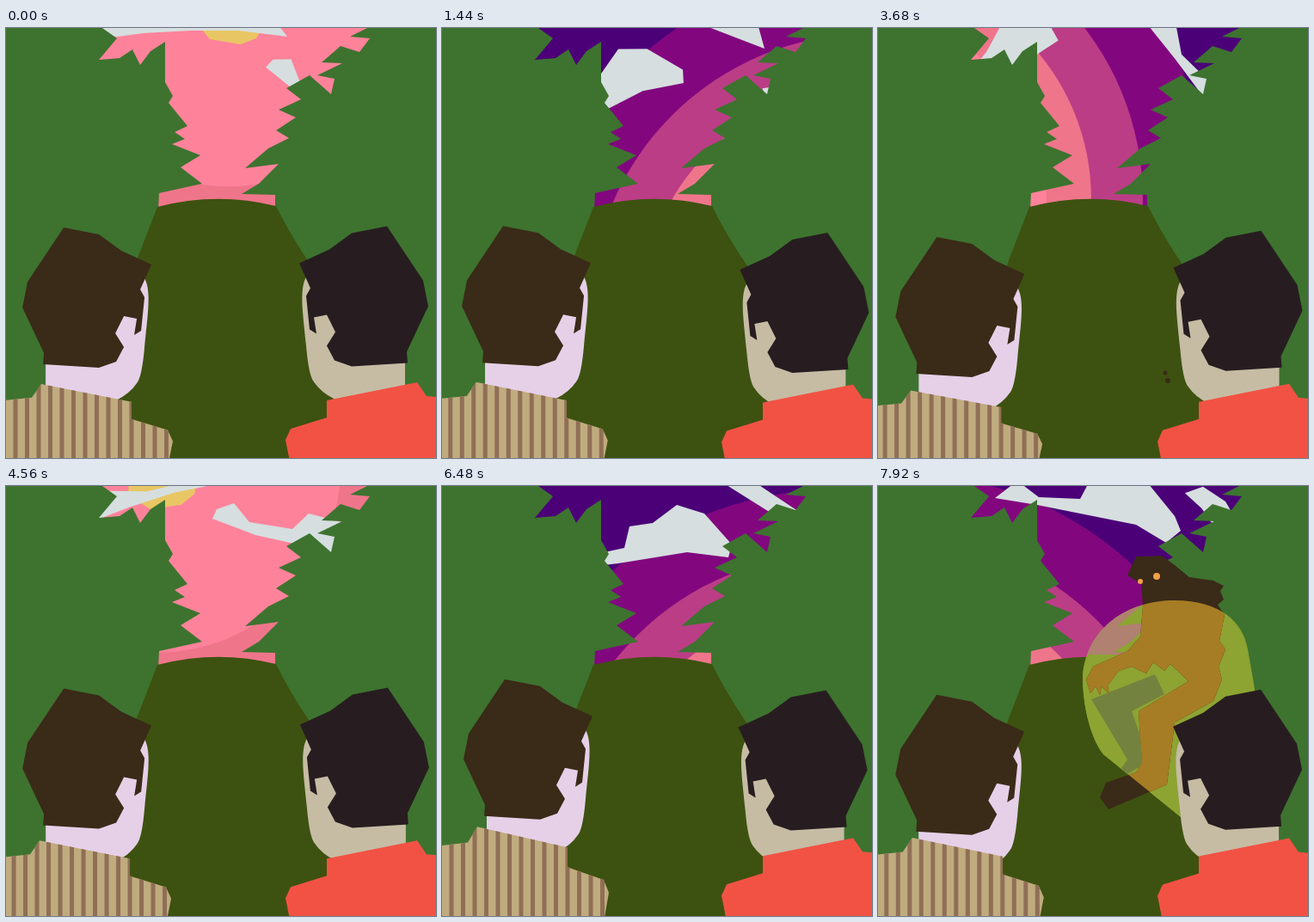
Animation, 500 px wide and 500 px high, one loop 8000 ms. Source, as an HTML page with a canvas:

```html
<!DOCTYPE html>
<html lang="en">
<head>
<meta charset="utf-8">
<title>Turning sky</title>
<style>
html, body { margin: 0; width: 100%; height: 100%; overflow: hidden; background: #3d732f; }
canvas { display: block; }
</style>
</head>
<body>
<canvas id="stage" width="500" height="500"></canvas>
<script>
const ctx = document.getElementById('stage').getContext('2d');
const LOOP = 8000, STEP = 80, TURN = 4800;
const SKY = { x: 247, y: 238 };
const GREEN = '#3d732f', BROWN = '#3a2a18', CLOUD = '#d6dedf';

const path = d => new Path2D('M' + d + 'Z');
const rad = deg => deg * Math.PI / 180;
// Cosine of the time within a period in ms
const wave = (t, period) => Math.cos(2 * Math.PI * t / period);
const smooth = k => {
  k = Math.max(0, Math.min(1, k));
  return k * k * (3 - 2 * k);
};

function fill(shape, color) {
  ctx.fillStyle = color;
  ctx.fill(shape);
}

function scoped(draw) {
  ctx.save();
  draw();
  ctx.restore();
}

function dot(x, y, r, color) {
  const disc = new Path2D();
  disc.arc(x, y, r, 0, 2 * Math.PI);
  fill(disc, color);
}

const sun = path('228,2 237,13 273,19 291,12 303,-8 280,-68 240,-66 219,-15');
const moon = path('208,8 218,30 243,40 277,33 286,21 265,27 261,8');
// Each cloud with the turn, in degrees, at which its points hold
const clouds = [
  [0, path('100,14 160,6 215,3 270,3 327,10 318,-2 240,-8 195,-23 120,-12')],
  [54, path('185,38 190,28 225,15 305,22 320,45 250,52')],
  [108, path('250,-16 310,-1 375,24 367,-5 285,-28')],
  [126, path('119,100 119,85 135,68 161,83 212,72 218,47 245,43 273,22 305,32 337,68 333,83 285,77 205,90')],
  [174, path('103,28 107,6 135,-8 295,-8 315,17 265,10 220,11 165,17 128,20')],
  [234, path('136,14 162,-6 187,13 235,15 243,0 310,-8 345,35 352,52 335,66 300,45 240,33 185,22')],
  [342, path('240,38 245,27 265,20 283,42 333,50 352,32 390,42 439,46 460,81 436,113 413,98 335,67 290,57')]
];
const glow = [[400, '#82077f'], [325, '#bb3d86'], [265, '#ef758b'], [213, '#ff829b']];

const gap = path('112,-5 112,0 129,12 108,37 132,35 147,25 156,43 168,27 185,16 185,63 194,79 189,87 ' +
  '211,114 196,121 208,129 193,135 226,148 203,162 228,181 178,192 177,212 313,212 313,194 274,193 ' +
  '294,181 317,158 278,163 305,140 329,128 314,119 337,104 317,95 343,83 326,70 353,55 378,77 382,59 ' +
  '362,55 391,41 367,40 389,21 411,28 423,12 400,10 420,0 420,-5');
const leaves = new Path2D();
leaves.rect(0, 0, 500, 500);
leaves.addPath(gap);
const hill = path('176,208 Q245,190 314,207 Q330,240 356,278 L380,340 V500 H130 V340 L152,270');

// The right figure is the left one mirrored
const face = path('163,290 C171,305 167,330 163,370 Q160,405 154,412 Q146,424 130,432 L120,460 H48 V385');
const hair = path('69,231 110,239 136,258 171,274 158,303 163,312 159,351 151,356 154,337 139,334 ' +
  '129,354 139,370 130,387 110,394 45,390 46,377 21,324 27,294');
const body = path('41,413 146,434 146,454 188,467 194,480 190,500 180,560 -40,560 -40,432 0,432 30,429');

const beast = path('290,104 300,82 330,81 345,92 362,106 390,110 402,116 398,122 402,132 395,138 403,150 ' +
  '397,180 404,190 396,210 400,225 390,250 345,275 336,347 268,376 258,362 265,345 300,333 ' +
  '307,322 303,262 361,227 340,207 333,215 320,205 312,218 295,210 280,215 ' +
  '267,232 269,242 260,233 258,243 253,233 247,241 242,225 250,210 290,192 305,175 308,140 306,114');
const farLeg = path('248,248 322,219 333,242 295,262 305,290 307,325 288,336 283,328 290,318');
const beam = path('352,385 L262,312 C245,290 238,250 238,222 C242,165 290,133 345,133 C400,133 425,160 430,190 L438,236 V385');

function drawSky(t) {
  const turn = t / TURN * 360, a = rad(turn + 2.5);
  const turned = (from, shape, color) => scoped(() => {
    ctx.translate(SKY.x, SKY.y);
    ctx.rotate(rad(turn - from));
    ctx.translate(-SKY.x, -SKY.y);
    fill(shape, color);
  });
  ctx.fillStyle = '#4b0078';
  ctx.fillRect(0, 0, 500, 500);
  for (const [r, color] of glow)
    dot(SKY.x + 267 * Math.sin(a), SKY.y - 267 * Math.cos(a), r, color);
  turned(0, sun, '#e9c664');
  turned(174, moon, '#bb3d86');
  for (const [from, shape] of clouds) turned(from, shape, CLOUD);
}

function drawFingers(t) {
  if (t < 3400 || t > 4000) return;
  const x = 14 * smooth(Math.abs(t - 3680) / 300);
  dot(334 + x, 401, 2.5, BROWN);
  dot(337 + x, 410, 3, BROWN);
}

function drawBeast(t) {
  if (t < 6800) return;
  const lit = t >= 7500;
  const slide = 190 * (1 - smooth((t - 6800) / 800));
  if (lit) {
    fill(beam, '#8da332');
    scoped(() => {
      ctx.clip(hill);
      fill(beam, '#8da332');
    });
    scoped(() => {
      ctx.clip(gap);
      ctx.clip(beam);
      ctx.fillStyle = '#b08070';
      ctx.fillRect(230, 130, 100, 66);
    });
  }
  scoped(() => {
    ctx.translate(slide, 0);
    fill(beast, BROWN);
    dot(305, 111, 3, '#f0a04a');
    dot(324, 105, 4, '#f0a04a');
  });
  if (lit) scoped(() => {
    ctx.clip(beam);
    ctx.translate(slide, 0);
    fill(farLeg, '#74823f');
    fill(beast, '#a67d24');
  });
}

function drawHead(x, y, skin, hairColor) {
  scoped(() => {
    ctx.translate(x, y);
    fill(face, skin);
    fill(hair, hairColor);
  });
}

function drawLeft(t) {
  const bob = 1 + 11 * Math.min(1, (t / 3680) ** 2) * wave(t - 3680, 4400);
  drawHead(1 + 3 * wave(t - 2250, 4200), bob, '#e6d0e8', BROWN);
  scoped(() => {
    // The chest stretches from below the stage
    const lift = bob - (t / 2000) ** 2;
    ctx.translate(1.5 * wave(t, 6500) - 1.5, 530);
    ctx.scale(1, 1 - lift / 117);
    ctx.translate(0, -530);
    fill(body, '#c0ab7f');
    ctx.clip(body);
    ctx.fillStyle = '#8f6f55';
    for (let x = -32; x < 200; x += 13.5) ctx.fillRect(x, 380, 5, 190);
  });
}

function drawRight(t) {
  const swing = wave(t, 4600);
  const x = 4.5 - t / 3000 - 4.5 * swing * Math.exp(-t / 6000);
  const y = 5.5 - 6 * swing * Math.exp(-t / 4000);
  scoped(() => {
    ctx.translate(512, 0);
    ctx.scale(-1, 1);
    drawHead(-x, y, '#c6bca4', '#271d20');
    ctx.translate(-7, 3 * wave(t - 2320, 9300) - 1);
    fill(body, '#f25244');
  });
}

function draw(t) {
  drawSky(t);
  ctx.fillStyle = GREEN;
  ctx.fill(leaves, 'evenodd');
  fill(hill, '#3d5210');
  drawFingers(t);
  drawBeast(t);
  drawLeft(t);
  drawRight(t);
}

const start = performance.now();
function frame() {
  const t = (performance.now() - start) % LOOP;
  draw(Math.floor(t / STEP) * STEP);
  requestAnimationFrame(frame);
}
frame();
</script>
</body>
</html>
```
